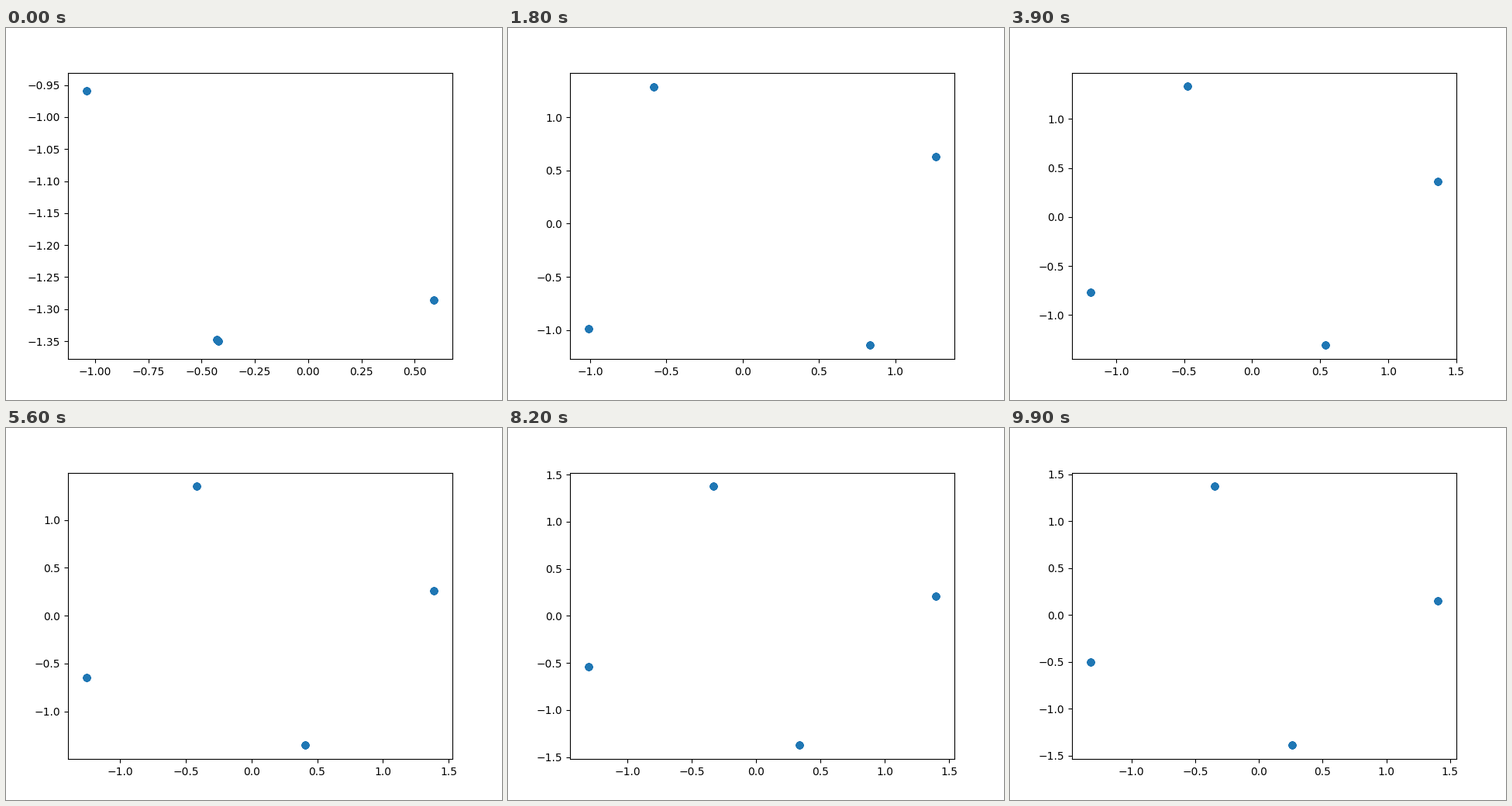
A matplotlib script that plays this animation: 640x480 px, repeating every 10000 ms.

```python
import numpy as np
import matplotlib.pyplot as plt
from matplotlib.animation import FuncAnimation

FRAMES = 100
INTERVAL = 100
RADIUS = np.sqrt(2)
COPIES = 25  # stacked markers give the dots their hard edge

# Four points on a circle, angles in degrees
START = np.array([-137.3, -107.65, -107.4, -65.37])
REST = np.array([-260.2, -162.0, -79.5, 6.5])
OFFSET = np.array([20.25, 43.45, 50.06, 42.3])
DECAY = np.array([55, 36, 27, 24])
SWAY = np.array([-1, 0, 1, 1])


def angles_at(t):
    """A quick burst apart, then a slow drift to rest with a growing sway."""
    sway = (t / 90) ** 3 * np.sin(2 * np.pi * (t - 73) / 40)
    drift = REST + OFFSET * np.exp(-t / DECAY) + SWAY * sway
    burst = 1 - np.exp(-(t / 4.45) ** 5)
    return START + (drift - START) * burst


def limits(values, pad):
    lo, hi = values.min() - pad, values.max() + pad
    margin = 0.05 * (hi - lo)
    return lo - margin, hi + margin


fig, ax = plt.subplots(figsize=(6.4, 4.8), dpi=100)
fig.subplots_adjust(left=0.125, right=0.9, bottom=0.11, top=0.88)
dots = ax.scatter(np.zeros(4 * COPIES), np.zeros(4 * COPIES), s=36, color="#1f77b4")


def update(frame):
    a = np.radians(angles_at(frame))
    points = RADIUS * np.column_stack([np.cos(a), np.sin(a)])
    dots.set_offsets(np.repeat(points, COPIES, axis=0))
    # Pad by 3 px as a fraction of the axes size
    ax.set_xlim(limits(points[:, 0], 3 / 496))
    ax.set_ylim(limits(points[:, 1], 3 / 369.6))
    return dots,


anim = FuncAnimation(fig, update, frames=FRAMES, interval=INTERVAL,
                     repeat=True, repeat_delay=0, blit=False)
plt.show()
```
